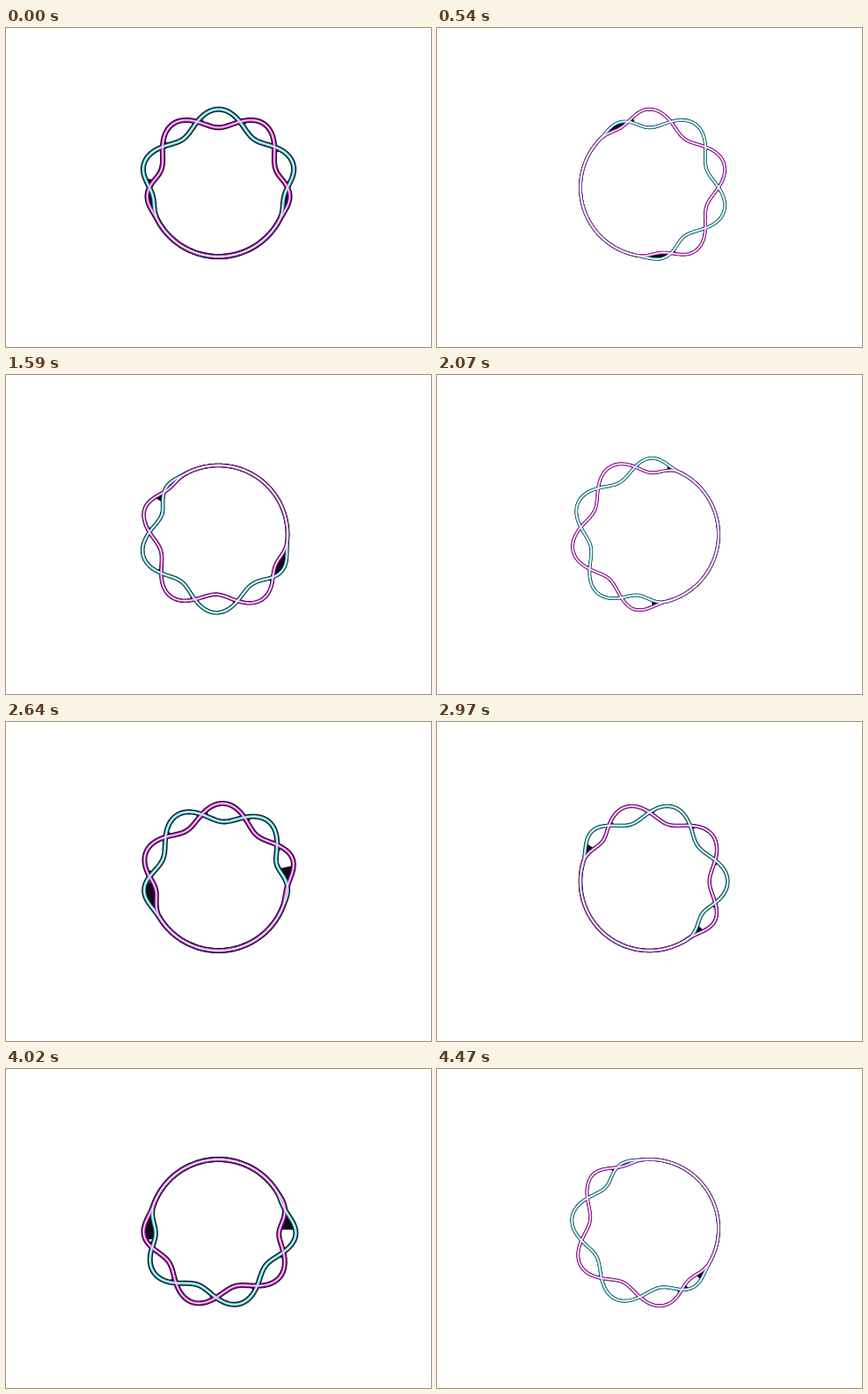
An HTML page with a canvas for the animation above (4.5 s loop, 480 px wide and 360 px high).

```html
<!DOCTYPE html>
<html lang="en">
<head>
<meta charset="utf-8">
<title>Twisted ring</title>
<style>
html, body { margin: 0; width: 100%; height: 100%; overflow: hidden; background: #fff; }
canvas { display: block; }
</style>
</head>
<body>
<canvas id="stage" width="480" height="360"></canvas>
<script>
const ctx = document.getElementById('stage').getContext('2d');
const LOOP = 4500, TICK = 30, TURN = 2700;
const RADIUS = 78, SWING = 10.3, LOBES = 5;
const TAU = Math.PI * 2, DEG = Math.PI / 180;
const STEPS = 360;
const DARK = '#120a18';
const CYAN = { sign: 1, tint: '#124a50', color: '#40cfd0' };
const MAGENTA = { sign: -1, tint: '#6a1470', color: '#d63ad6' };
const mix = (a, b, k) => a + (b - a) * k;

function smoothstep(a, b, x) {
  const k = Math.min(1, Math.max(0, (x - a) / (b - a)));
  return k * k * (3 - 2 * k);
}

// Angular distance in degrees from the middle of the twisted part.
function distance(angle, center) {
  const d = angle - center;
  return Math.abs(Math.atan2(Math.sin(d), Math.cos(d))) / DEG;
}

function point(angle, offset) {
  const r = RADIUS + offset;
  return [240 + r * Math.sin(angle), 180 - r * Math.cos(angle)];
}

function sampleRing(time) {
  const center = TAU * time / TURN;
  const drift = -Math.PI * time / TURN;
  return Array.from({ length: STEPS + 1 }, (_, i) => {
    const angle = i * TAU / STEPS;
    const dist = distance(angle, center);
    const envelope = 1 - smoothstep(75, 120, dist);
    return { angle, dist, offset: SWING * envelope * Math.cos(LOBES * (angle - drift)) };
  });
}

function strandPath(ring, sign) {
  const path = new Path2D();
  for (const s of ring) path.lineTo(...point(s.angle, sign * s.offset));
  path.closePath();
  return path;
}

function stroke(path, color, width) {
  ctx.strokeStyle = color;
  ctx.lineWidth = width;
  ctx.stroke(path);
}

// The glows merge into solid dark wedges wherever the strands run close.
function fillGaps(ring, glow) {
  ctx.fillStyle = DARK;
  ctx.beginPath();
  for (let i = 0; i < STEPS; i++) {
    const a = ring[i], b = ring[i + 1];
    const limit = a.dist > 84 ? mix(3.5, 9, glow) : mix(2.6, 4, glow);
    if (Math.abs(a.offset) > limit) continue;
    ctx.moveTo(...point(a.angle, a.offset));
    ctx.lineTo(...point(b.angle, b.offset));
    ctx.lineTo(...point(b.angle, -b.offset));
    ctx.lineTo(...point(a.angle, -a.offset));
    ctx.closePath();
  }
  ctx.fill();
}

function draw(time) {
  const ring = sampleRing(time);
  const glow = Math.cos(TAU * time / TURN) ** 6;
  const strands = [CYAN, MAGENTA].map(s => ({ ...s, path: strandPath(ring, s.sign) }));

  ctx.fillStyle = '#fff';
  ctx.fillRect(0, 0, 480, 360);
  ctx.lineJoin = 'round';
  for (const s of strands) stroke(s.path, DARK, mix(3.8, 6, glow));
  fillGaps(ring, glow);
  for (const s of strands) stroke(s.path, s.tint, mix(3.2, 4.2, glow));
  for (const s of strands) stroke(s.path, s.color, mix(2.7, 3, glow));
  for (const s of strands) stroke(s.path, '#fff6ff', mix(1.4, 1.1, glow));
}

const start = performance.now();
function frame() {
  const elapsed = (performance.now() - start) % LOOP;
  draw(Math.floor(elapsed / TICK) * TICK);
  requestAnimationFrame(frame);
}
frame();
</script>
</body>
</html>
```
